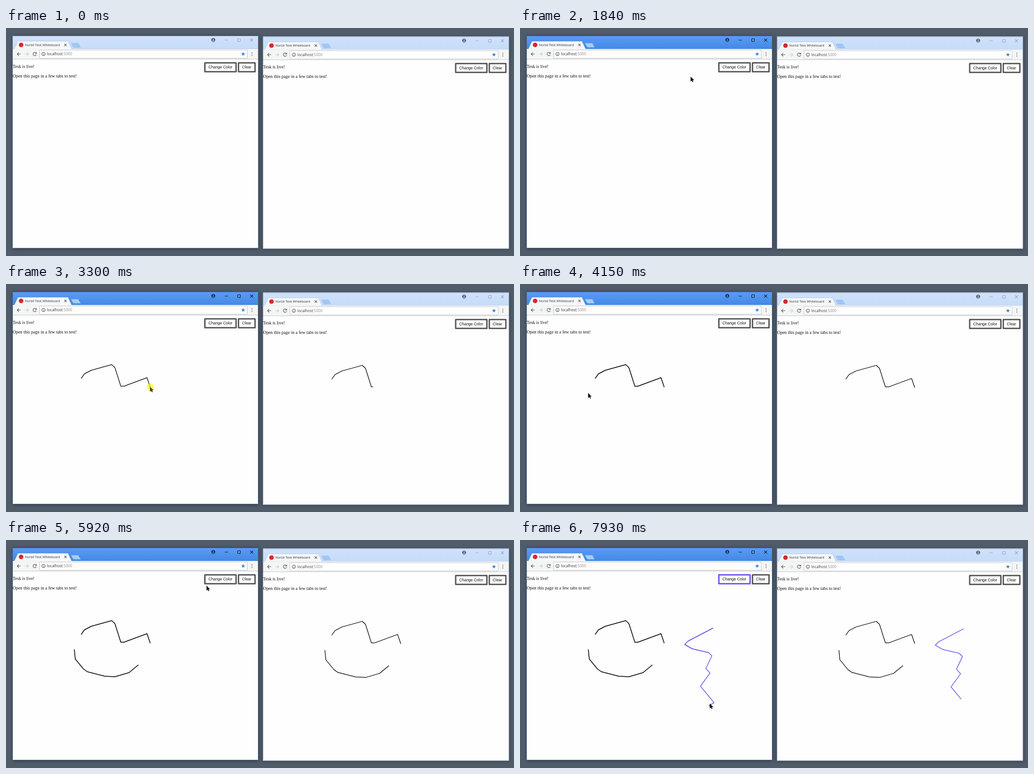
An HTML page with a canvas for the animation above (8000 ms loop, 1115 by 502 pixels).

```html
<!DOCTYPE html>
<html lang="en">
<head>
<meta charset="utf-8">
<title>Shared whiteboard</title>
<style>
html, body { margin: 0; width: 100%; height: 100%; overflow: hidden; background: #505c6a; }
canvas { display: block; width: 1115px; height: 502px; }
</style>
</head>
<body>
<canvas id="stage" width="1115" height="502"></canvas>
<script>
const ctx = document.getElementById('stage').getContext('2d');
const LOOP = 8000, TICKS = 104, TICK = LOOP / TICKS;
const PEER_LAG = 3, ECHO_LAG = 8;
const BLACK = '#1a1a1a', PURPLE = '#6f50f0', GREY = '#555555';
const UI = '"Open Sans", "Noto Sans", sans-serif';
const SERIF = '"Liberation Serif", serif';
const SANS = '"Liberation Sans", sans-serif';

const smooth = u => u * u * (3 - 2 * u);
const slowing = power => u => 1 - (1 - u) ** power;

// Every act starts where the pointer was left by the act before it.
const acts = [];
let rest = [1076, 489];
function act(from, to, points, options) {
  acts.push({ from, to, path: [rest, ...points], ...options });
  rest = acts.at(-1).path.at(-1);
}
const move = (from, to, x, y) => act(from, to, [[x, y]], { ease: smooth });
const click = tick => act(tick, tick, [], { ease: smooth, press: true });
const draw = (from, to, color, power, points) =>
  act(from, to, points, { color, ease: slowing(power), press: true });

move(2, 7, 425, 249);
move(8, 12, 224, 232);
move(14, 20, 375, 108);
click(22);
move(24, 31, 165, 208);
draw(35, 43, BLACK, 1, [[172, 198], [187, 190], [232, 177.5], [239, 184],
  [252, 225], [259, 225], [309.5, 206.3], [316.5, 227]]);
move(45, 51, 150, 241);
draw(55, 62, BLACK, 1.1, [[152, 262], [170, 284], [178.5, 290], [217, 300],
  [239.5, 301], [270, 292], [290.5, 275]]);
move(67, 78.5, 448, 93);
click(83);
move(86, 90, 423.5, 194);
draw(91, 102, PURPLE, 1.4, [[369, 222.5], [361.5, 230], [378, 239.5], [414, 248],
  [421, 255], [408, 283], [417, 293], [396, 322], [426, 358], [414.5, 365]]);
move(102.5, 103, 417, 361);

// The leading part of a path, up to a fraction of its length.
function lead(path, fraction) {
  const lengths = path.slice(1).map(([x, y], i) => Math.hypot(x - path[i][0], y - path[i][1]));
  let left = fraction * lengths.reduce((sum, d) => sum + d, 0);
  const result = [path[0]];
  for (let i = 0; i < lengths.length && left > 0; i++) {
    const u = Math.min(1, left / lengths[i]), [x, y] = path[i];
    result.push([x + (path[i + 1][0] - x) * u, y + (path[i + 1][1] - y) * u]);
    left -= lengths[i];
  }
  return result;
}

function travelled({ from, to, path, ease }, k) {
  return lead(path, ease(Math.max(0, Math.min(1, (k - from) / (to - from || 1)))));
}

function box(x, y, w, h, fill) {
  ctx.fillStyle = fill;
  ctx.fillRect(x, y, w, h);
}

function disc(x, y, r, fill) {
  ctx.beginPath();
  ctx.arc(x, y, r, 0, Math.PI * 2);
  ctx.fillStyle = fill;
  ctx.fill();
}

function trace(points, closed) {
  ctx.beginPath();
  points.forEach(([x, y]) => ctx.lineTo(x, y));
  if (closed) ctx.closePath();
}

function line(points, color, width = 1) {
  trace(points);
  ctx.strokeStyle = color;
  ctx.lineWidth = width;
  ctx.stroke();
}

function shape(points, fill, edge) {
  trace(points, true);
  ctx.fillStyle = fill;
  ctx.fill();
  if (!edge) return;
  ctx.strokeStyle = edge;
  ctx.lineWidth = 0.6;
  ctx.stroke();
}

function frame(x, y, w, h, color, width = 1) {
  ctx.strokeStyle = color;
  ctx.lineWidth = width;
  ctx.strokeRect(x, y, w, h);
}

function ring(x, y, r, color, from = 0, to = Math.PI * 2) {
  ctx.beginPath();
  ctx.arc(x, y, r, from, to);
  ctx.strokeStyle = color;
  ctx.lineWidth = 1.1;
  ctx.stroke();
}

function label(text, x, y, size, family, color) {
  ctx.font = `${size}px ${family}`;
  ctx.fillStyle = color;
  ctx.fillText(text, x, y);
}

function cross(x, y, r, color) {
  line([[x - r, y - r], [x + r, y + r]], color, 1.1);
  line([[x - r, y + r], [x + r, y - r]], color, 1.1);
}

function arrow(x, y, dir, color) {
  line([[x - 4 * dir, y], [x + 4 * dir, y]], color, 1.1);
  line([[x, y - 3.7], [x - 3.7 * dir, y], [x, y + 3.7]], color, 1.1);
}

function star(x, y) {
  const points = Array.from({ length: 10 }, (_, i) => {
    const a = -Math.PI / 2 + i * Math.PI / 5, r = i % 2 ? 2 : 4.9;
    return [x + r * Math.cos(a), y + r * Math.sin(a)];
  });
  shape(points, '#3a87d9');
}

function button(x, w, text, color) {
  frame(x + 1.5, 59.7, w - 3, 19.5, color, 3);
  label(text, x + 9.3, 72, 8.5, SANS, '#111');
}

function titleBar(w, active) {
  const bar = ctx.createLinearGradient(0, 0, 0, 29);
  bar.addColorStop(0, active ? '#589df6' : '#d0e1fc');
  bar.addColorStop(1, active ? '#4488e4' : '#c6dcf8');
  box(0, 0, w, 29, bar);
  box(0, 28.4, w, 0.6, 'rgba(0, 20, 60, .2)');

  shape([[128.5, 16.5], [144, 16.5], [149, 25.5], [133.5, 25.5]],
    active ? '#a5cbfa' : '#9fc7f4', active ? '#86b4ee' : '#8fb8e6');
  shape([[3.5, 29.5], [11.5, 12], [121.5, 12], [130, 29.5]],
    '#f6f7f8', active ? '#3d78c6' : '#a5b8cf');
  disc(18.7, 20.3, 5, '#d5282d');
  label('Norbil Tesk Whiteboard', 27.3, 22.8, 7, UI, '#333');
  cross(116, 20.3, 2.4, '#444');

  const userX = w - 98.5, skin = active ? '#589df6' : '#cfe0fb';
  disc(userX, 9.3, 4.2, active ? '#152946' : '#47505c');
  disc(userX, 7.8, 1.4, skin);
  box(userX - 2.3, 10.4, 4.6, 1.6, skin);

  const ink = active ? '#10141c' : '#96a3b3';
  line([[w - 73.5, 9.7], [w - 66.5, 9.7]], ink);
  frame(w - 45, 6.7, 6, 6, ink);
  cross(w - 14.3, 9.7, 3.2, ink);
}

function toolbar(w) {
  const y = 40.3, dark = '#505050';
  box(0, 29, w, 22, '#f4f5f5');
  box(0, 51, w, 0.9, '#bcbec0');
  arrow(13.7, y, 1, dark);
  arrow(31.2, y, -1, '#c9c9c9');
  ring(48.5, y, 3.7, dark, 0.3, Math.PI * 1.75);
  shape([[52.7, y - 4.6], [52.7, y - 0.8], [48.9, y - 0.8]], dark);

  box(59.2, 31.5, w - 83.2, 18, '#fff');
  frame(59.2, 31.5, w - 83.2, 18, '#bbbdbf', 0.9);
  ring(67.8, y, 3.6, dark);
  box(67.3, y - 0.6, 1, 2.6, dark);
  box(67.3, y - 2.2, 1, 1, dark);

  label('localhost', 75.5, 43.3, 8.2, UI, '#333');
  label(':5000', 75.5 + ctx.measureText('localhost').width, 43.3, 8.2, UI, '#888');
  star(w - 33, y);
  for (let i = -1; i <= 1; i++) disc(w - 13.5, y + i * 3.4, 0.9, dark);
}

function browser(x, y, w, active, color) {
  ctx.save();
  ctx.translate(x, y);
  ctx.shadowColor = 'rgba(15, 22, 32, .55)';
  ctx.shadowBlur = 7;
  ctx.shadowOffsetY = 1;
  box(0, 0, w, 467.5, '#fefefe');
  ctx.shadowColor = 'transparent';
  titleBar(w, active);
  toolbar(w);
  frame(0, 0.5, w, 467, active ? '#45638c' : '#7f8d9d');
  label('Tesk is live!', 0.3, 70.5, 9.8, SERIF, '#111');
  label('Open this page in a few tabs to test!', 0.3, 91.5, 9.8, SERIF, '#111');
  button(w - 118.5, 71.5, 'Change Color', color);
  button(w - 44.7, 39.3, 'Clear', GREY);
  ctx.restore();
}

function ink(stroke, k) {
  if (k > stroke.from) line(travelled(stroke, k), stroke.color, 1.5);
}

function pointer(k) {
  const current = acts.findLast(a => a.from <= k);
  if (!current) return;
  const pressed = current.press && k < current.to + 2;
  ctx.save();
  ctx.translate(...travelled(current, k).at(-1));
  if (pressed) disc(0, 0, 8, 'rgba(255, 255, 0, .45)');
  shape([[0, 0], [0, 11], [2.5, 8.7], [4.3, 12.3], [6, 11.5], [4.3, 8], [7.7, 7.9]]
    .map(([x, y]) => [x - 0.5, y - 1]), '#080808');
  if (pressed) disc(0, 0, 8, 'rgba(255, 255, 0, .28)');
  ctx.restore();
}

function render(time) {
  const k = Math.min(TICKS - 1, Math.floor((time % LOOP + 30) / TICK));
  ctx.lineJoin = 'round';
  box(0, 0, 1115, 502, '#505c6a');
  browser(14.5, 17, 539, k >= 22, k >= 84 ? PURPLE : GREY);
  browser(564, 18.5, 540, false, GREY);

  for (const stroke of acts.filter(a => a.color)) {
    ink(stroke, k);
    ink(stroke, k - ECHO_LAG);
    ctx.save();
    ctx.translate(550, 1.6);
    ink(stroke, k - PEER_LAG);
    ctx.restore();
  }
  pointer(k);
}

const began = performance.now();
function loop() {
  render(performance.now() - began);
  requestAnimationFrame(loop);
}
loop();
</script>
</body>
</html>
```
